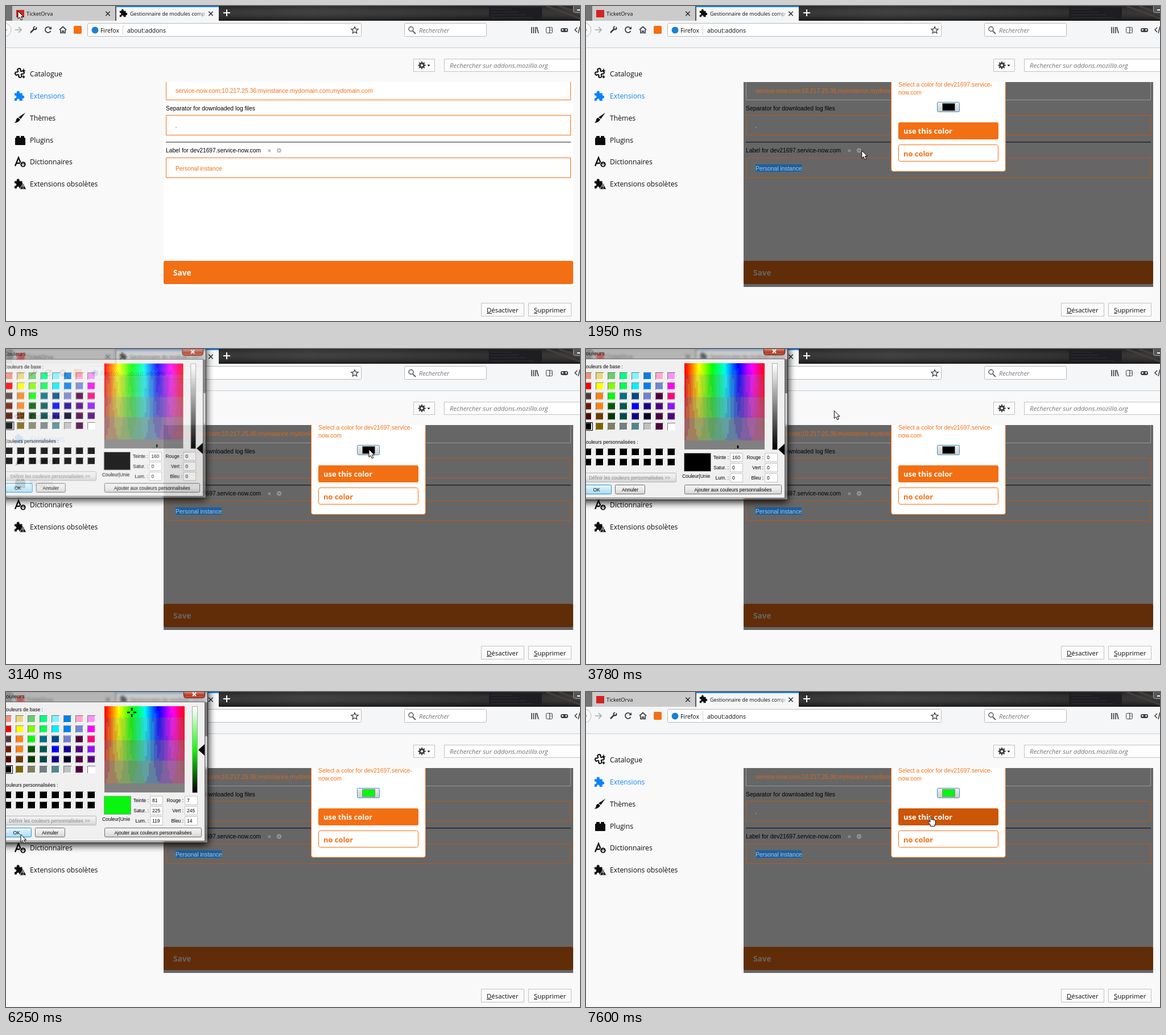
Recreate the animation shown at these times as an HTML page with a canvas. Size 1009 by 555 pixels, loop 8000 ms.

```html
<!DOCTYPE html>
<html lang="fr">
<head>
<meta charset="utf-8">
<title>Modules</title>
<style>
html, body { margin: 0; width: 100%; height: 100%; overflow: hidden; background: #f9f9fa }
canvas { display: block }
</style>
</head>
<body>
<canvas id="stage" width="1009" height="555"></canvas>
<script>
const stage = document.getElementById('stage'), page = stage.getContext('2d');
const PAD = 40, layer = document.createElement('canvas');
layer.width = 440; layer.height = 340;
const dialogCtx = layer.getContext('2d');
dialogCtx.translate(PAD, PAD);
let g = page;

const UI = '"Open Sans", "Noto Sans", sans-serif', ARIAL = '"Liberation Sans", Arial, sans-serif';
const ORANGE = '#f36f14', INK = '#0c0c0d', ICON = '#3d3d40';
const clamp = v => Math.max(0, Math.min(1, v));

function rect(x, y, w, h, color) { g.fillStyle = color; g.fillRect(x, y, w, h); }
function box(x, y, w, h, fill, stroke, r = 0) {
  const inset = stroke ? .5 : 0;
  g.beginPath();
  g.roundRect(x + inset, y + inset, w - 2 * inset, h - 2 * inset, r);
  if (fill) { g.fillStyle = fill; g.fill(); }
  if (stroke) { g.lineWidth = 1; g.strokeStyle = stroke; g.stroke(); }
}
function text(s, x, y, size, color = INK, font = UI, style = '', align = 'left') {
  g.font = `${style} ${size}px ${font}`;
  g.textAlign = align;
  g.fillStyle = color;
  g.fillText(s, x, y);
}
function shape(d, x, y, fill, stroke, width = 1.5) {
  const p = new Path2D(d);
  g.save();
  g.translate(x, y);
  if (fill) { g.fillStyle = fill; g.fill(p); }
  if (stroke) { g.strokeStyle = stroke; g.lineWidth = width; g.stroke(p); }
  g.restore();
}
function disc(x, y, r, fill, stroke, width = 1.5) {
  g.beginPath();
  g.arc(x, y, r, 0, 7);
  if (fill) { g.fillStyle = fill; g.fill(); }
  if (stroke) { g.strokeStyle = stroke; g.lineWidth = width; g.stroke(); }
}
function ramp(x0, y0, x1, y1, ...colors) {
  const grad = g.createLinearGradient(x0, y0, x1, y1);
  colors.forEach((c, i) => grad.addColorStop(i / (colors.length - 1), c));
  return grad;
}
function clipped(x, y, w, h, paint) {
  g.save();
  g.beginPath(); g.rect(x, y, w, h); g.clip();
  paint();
  g.restore();
}
function gear(x, y, r, color, hole) {
  for (let i = 0; i < 8; i++) {
    g.save(); g.translate(x, y); g.rotate(i * Math.PI / 4);
    rect(-r * .2, -r * 1.35, r * .4, r, color);
    g.restore();
  }
  disc(x, y, r * .72, null, color, r * .55);
  disc(x, y, r * .4, hole);
}
const PUZZLE = 'M1 6h4a2.6 2.6 0 1 1 4.5 0h5v4a2.6 2.6 0 1 1 0 5v4h-5a2.4 2.4 0 1 0-4.5 0h-4v-4.5a2.4 2.4 0 1 0 0-4.5z';
function puzzle(x, y, scale, color) {
  g.save(); g.translate(x, y); g.scale(scale, scale);
  shape(PUZZLE, 0, 0, color);
  g.restore();
}
const cross = (x, y, r, color, w) => shape(`M${-r} ${-r}L${r} ${r}M${r} ${-r}L${-r} ${r}`, x, y, null, color, w);

function drawBrowser() {
  // Title bar and tabs
  rect(0, 0, 1009, 26, ramp(374, 0, 1009, 0, '#242424', '#303030', '#282828', '#1c1c1c', '#292726'));
  rect(374, 0, 635, 26, ramp(0, 0, 0, 26, '#fff0', '#0006'));
  rect(849, 2, 93, 22, '#1e1e22');
  for (let i = 0; i < 4; i++) rect(853, 5 + i * 5, 35 + i * 13 % 40, 1, '#2e2e33');
  shape('M950 0L1009 22M972 0L1009 13', 0, 0, null, '#453f3c', 3);
  box(997, -5, 20, 17, '#555', '#aaa', 3);
  rect(1004, 6, 5, 2, '#fff');
  rect(0, 0, 11, 26, '#737373');
  rect(11, 0, 181, 26, '#cbcbcb');
  rect(192, 0, 2, 26, '#555');
  rect(194, 0, 180, 26, '#f5f6f7');
  rect(194, 0, 180, 2, '#0a84ff');
  rect(18, 7, 14, 13, '#d3221f');
  text('TicketOrva', 36, 17, 9.4);
  puzzle(199, 4, .8, INK);
  clipped(210, 0, 141, 26, () => {
    text('Gestionnaire de modules comp', 218, 17, 9.05);
    rect(335, 3, 16, 22, ramp(335, 0, 351, 0, '#f5f6f700', '#f5f6f7b0'));
  });
  cross(179, 13.5, 3.7, '#222', 1.4);
  cross(360, 13.5, 3.7, '#222', 1.4);
  shape('M-6 0H6M0-6V6', 388, 12, null, '#fff', 2);

  // Toolbar
  rect(0, 26, 1009, 47, '#f5f6f7');
  rect(0, 73, 1009, 1, '#cbcbcd');
  disc(-3, 42, 12, '#fbfbfb', '#bbb', 1);
  rect(0, 41, 2, 2, '#aaa');
  shape('M-6 0H5M0-5L5 0L0 5', 22, 42, null, '#a9a9ab', 1.7);
  shape('M-5 5L1-1', 48, 42, null, ICON, 2.6);
  disc(51, 39, 2.4, null, ICON, 2.2);
  shape('M50 39L56 33', 0, 0, null, '#f5f6f7', 2);
  shape('M4.5 2A5 5 0 1 1 3.6-3.6', 74, 42, null, ICON, 1.8);
  shape('M6-6V-1H1z', 74, 42, ICON);
  shape('M-6 0L0-5.5L6 0M-4 0V5.5H-1.2V2H1.2V5.5H4V0', 100, 42, null, ICON, 1.7);
  box(119, 35, 14, 14, ORANGE, null, 2);
  box(143, 30, 482, 24, '#fff', '#b9b9bb', 2);
  disc(156.5, 42.5, 6, '#1c80cf');
  text('Firefox', 166, 47, 10.4);
  rect(205, 33, 1, 18, '#d2d2d4');
  text('about:addons', 213, 47, 10.5);
  shape('M0-6L1.8-2L6-1.7L2.8 1.2L3.8 5.5L0 3.2L-3.8 5.5L-2.8 1.2L-6-1.7L-1.8-2z', 613, 42.5, null, ICON, 1.3);
  box(700, 30, 145, 24, '#fff', '#b9b9bb', 2);
  disc(712, 40.5, 4, null, '#55555a');
  shape('M715 44L720 49', 0, 0, null, '#55555a', 1.8);
  text('Rechercher', 726, 47, 10.9, '#737378', UI, 'italic');
  shape('M924 37V48M927.5 37V48M931 37V48M933 37L936 48', 0, 0, null, ICON, 1.6);
  box(949, 37, 12, 11, null, ICON, 2);
  rect(955, 37, 1, 11, ICON);
  rect(957, 40, 2, 1, ICON); rect(957, 43, 2, 1, ICON);
  box(975, 39, 13, 7, ICON, null, 3);
  disc(978.3, 42, 1.5, '#f5f6f7'); disc(984.7, 42, 1.5, '#f5f6f7');
  shape('M1004 38L1000 42L1004 46M1009 36L1006 48', 0, 0, null, ICON);

  // Add-on manager frame
  rect(0, 74, 1009, 481, '#f9f9fa');
  box(716, 93, 38, 23, '#fbfbfb', '#c1c1c3');
  gear(731, 104.5, 5, ICON, '#fbfbfb');
  shape('M740.5 103.5h5l-2.5 3z', 0, 0, INK);
  box(770, 93, 250, 23, '#fff', '#c1c1c3');
  text('Rechercher sur addons.mozilla.org', 780, 109, 11.35, '#737378', UI, 'italic');
  ['Catalogue', 'Extensions', 'Thèmes', 'Plugins', 'Dictionnaires', 'Extensions obsolètes'].forEach((s, i) =>
    text(s, 42, 124 + i * 38.85, 12.2, i == 1 ? '#0a84ff' : INK));
  for (let i = 0; i < 4; i++) {
    g.save(); g.translate(24, 118); g.rotate(i * Math.PI / 2);
    shape('M-2.5-3L-4-5.5Q-3-8 0-8Q2.5-7 1.5-4L3-2', 0, 0, null, INK, 2);
    g.restore();
  }
  shape('M0-4L1 0L4 1L1 2L0 5L-1 2L-4 1L-1 0z', 31, 113, INK);
  shape('M0-3L1 0L3 1L1 2L0 4L-1 2L-3 1L-1 0z', 31, 124, INK);
  puzzle(14, 147.5, 1.02, '#0a84ff');
  shape('M34 188L26 199L22 196zM21.5 197L25 200Q23 205 15 206Q18 203 18 200Q19 197 21.5 197z', 0, 0, INK);
  box(16, 232, 18, 13, INK, null, 1);
  rect(18, 229, 6, 3, INK); rect(26, 229, 6, 3, INK);
  shape('M16 282L22 267L28 282M18 277H26', 0, 0, null, INK, 2.3);
  disc(30, 279, 5.2, INK, '#f9f9fa', 1);
  shape('M30 276V281M27.5 279L30 281.5L32.5 279', 0, 0, null, '#fff', 1.3);
  puzzle(14, 302.5, 1, INK);
  shape('M30 313L36 323H24z', 0, 0, INK, '#f9f9fa', 1);
  rect(29.4, 316, 1.3, 3.5, '#fff'); rect(29.4, 320.5, 1.3, 1.3, '#fff');
  [['Désactiver', 835, 9], ['Supprimer', 918, 6]].forEach(([s, x, w]) => {
    box(x, 523, 76, 24, '#fbfbfb', '#c1c1c3');
    text(s, x + 10, 539.5, 11.4);
    rect(x + 10, 541, w, 1, INK);
  });
}

function drawOptions(modal, gearHot) {
  rect(277, 134, 720, 361, '#fff');
  clipped(277, 134, 720, 361, () => {
    box(277, 449, 720, 41, ORANGE, null, 3);
    text('Save', 294, 475, 13.7, '#fff', UI, 'bold');
    if (modal) rect(277, 134, 720, 361, 'rgba(0,0,0,.6)');
    const tint = modal ? '#d9681c' : ORANGE, edge = modal ? '#b85a1c' : ORANGE;
    box(281, 120, 712, 46, null, modal ? '#999' : ORANGE);
    box(281, 192, 712, 36, null, edge);
    box(281, 267, 712, 36, null, edge);
    text('service-now.com;10.217.25.36;myinstance.mydomain.com;mydomain.com', 298, 153, 10.5, tint, ARIAL);
    text('Separator for downloaded log files', 281, 184, 10.35, '#000', ARIAL);
    text(',', 298, 214, 11, modal ? '#bbb' : '#777', ARIAL, 'italic');
    rect(281, 239, 712, 1.5, modal ? '#222' : '#666');
    text('Label for dev21697.service-now.com', 281, 258, 10.25, '#000', ARIAL);
    cross(463, 255, 2.2, modal ? '#999' : '#aaa', 1.3);
    gear(480, 254.5, 3.4, gearHot ? ORANGE : modal ? '#999' : '#bbb', modal ? '#666' : '#fff');
    if (modal) rect(298, 279, 81, 13, '#1f5f9c');
    text('Personal instance', 298, 290, 10.25, modal ? '#a3c8ea' : ORANGE, ARIAL);
  });
}

function drawModal(pressed, color, hot) {
  clipped(530, 134, 220, 170, () => {
    box(536, 120, 202, 172, '#fff', ORANGE, 4);
    text('Select a color for dev21697.service-', 549, 142, 10.35, ORANGE, ARIAL);
    text('now.com', 549, 156, 10.35, ORANGE, ARIAL);
    box(617, 169, 40, 18, pressed ? ramp(0, 169, 0, 187, '#e5f4fc', '#98d1ef', '#68b3db') :
      ramp(0, 169, 0, 187, '#f2f2f2', '#dcdcdc', '#cfcfcf'), pressed ? '#2c628b' : '#3c8fc1', 2);
    box(626, 171, 23, 14, color, '#888');
    box(549, 205, 176, 30, hot ? '#cc5506' : ORANGE, null, 3);
    text('use this color', 558, 224.5, 12.9, '#fff', UI, 'bold');
    box(549, 244, 176, 30, '#fff', ORANGE, 3);
    text('no color', 558, 264.5, 12.9, ORANGE, UI, 'bold');
  });
}

const BASIC = `f0907a e8d878 68cf68 00ff80 80f4ff 0080e8 ffa8cc ff90ff
  ff0000 ffff00 80ff00 00ff50 00f0ff 0080f0 7088d0 ff00ff
  503838 ff8010 00ff00 006c84 004888 7080d0 500040 ff0080
  701800 ff8010 005800 005850 0000ff 180090 500080 9010ff
  480c00 703800 003800 004848 100088 000028 500040 500080
  000000 7c6400 808060 748080 508890 c0c0c0 500040 ffffff`.split(/\s+/);

function swatch(col, y, color) {
  const x = -4 + col * 21;
  rect(x, y - 6, 14, 13, '#777');
  rect(x + 1, y - 5, 13, 12, '#fff');
  rect(x + 1, y - 5, 12, 11, color);
}
const label = (s, x, y, align, color = '#000') => text(s, x, y, 8.45, color, ARIAL, '', align);
const PLAIN = ['#f4f4f4', '#e9e9e9', '#d2d2d2'], FOCUSED = ['#eef8fe', '#c8e9fc', '#a9daf5'];
function button(x, w, y, s, shades = PLAIN, border = '#707070') {
  box(x, y, w, 17, ramp(0, y, 0, y + 17, ...shades), border, 2);
  label(s, x + w / 2, y + 11.5, 'center');
}

// Hue across, saturation down, in coarse colour steps
function drawSpectrum() {
  const coarse = v => Math.round(v / 32) * 32;
  for (let x = 0; x < 141; x += 3)
    for (let y = 0; y < 152; y += 4) {
      const rgb = [0, 4, 2].map(k => {
        const hue = clamp(Math.abs((x / 23.5 + k) % 6 - 3) - 1);
        return coarse(128 + (hue * 255 - 128) * (1 - y / 152));
      });
      rect(173 + x, 25 + y, 3, 4, `rgb(${rgb})`);
    }
}

function drawDialog(picked, lit) {
  g.clearRect(-PAD, -PAD, 440, 340);
  // Glass frame over the blurred page
  g.shadowColor = '#000'; g.shadowBlur = 14; g.shadowOffsetY = 3;
  box(-PAD, -10, 355 + PAD, 276, '#aaa', '#222', 5);
  g.shadowColor = 'transparent';
  clipped(-PAD, 0, 354 + PAD, 265, () => {
    g.filter = 'blur(2px)';
    g.drawImage(stage, 0, 0);
    g.filter = 'none';
    rect(-PAD, 0, 400, 266, 'rgba(160,160,160,.5)');
  });
  rect(349, 18, 5, 60, '#777');
  box(-PAD, 17, 350 + PAD, 246, '#f0f0f0', '#666');
  box(312, -5, 38, 16, ramp(0, 0, 0, 11, '#d9897b', '#b93a22', '#c8604a'), '#5a1a12', 4);
  cross(331, 4, 3, '#fff', 2);
  text('Couleurs', -6, 11, 9.3, '#000');

  label('Couleurs de base :', -6, 34);
  BASIC.forEach((c, i) => swatch(i % 8, 47 + (i >> 3) * 17.8, '#' + c));
  box(-5, 129, 17, 15, null, '#000');
  label('Couleurs personnalisées :', -6, 167);
  for (let i = 0; i < 16; i++) swatch(i % 8, 181 + (i >> 3) * 18, '#000');
  button(-10, 169, 218, '', PLAIN, '#b5b5b5');
  label('Définir les couleurs personnalisées >>', 5, 229.5, 'left', '#838383');
  button(-8, 53, 239, 'OK', FOCUSED, '#2a94cc');
  button(51, 53, 239, 'Annuler');
  button(173, 171, 239, 'Ajouter aux couleurs personnalisées');

  drawSpectrum();
  clipped(173, 25, 141, 152, () =>
    shape('M-8 0H-3M3 0H8M0-8V-3M0 3V8', picked ? 221 : 267, picked ? 36 : 178, null, '#000', 2.6));
  box(327, 25, 10, 153, null, '#aaa');
  for (let i = 0; i < 38; i++)
    rect(328, 26 + i * 4, 8, i < 37 ? 4 : 3, `hsl(116 ${picked ? 94 : 0}% ${100 - i / 37 * 100}%)`);
  shape('M0 0L11-10V10z', 338, lit ? 102 : 177, '#000');

  box(172, 183, 48, 33, lit ? '#07f50e' : '#000', '#999');
  label('Couleur|Unie', 169, 227);
  const values = [picked ? 81 : 160, picked ? 225 : 0, lit ? 119 : 0, lit ? 7 : 0, lit ? 245 : 0, lit ? 14 : 0];
  ['Teinte :', 'Satur. :', 'Lum. :', 'Rouge :', 'Vert :', 'Bleu :'].forEach((s, i) => {
    const x = i < 3 ? 253 : 314, y = 183 + i % 3 * 18;
    label(s, x - 2, y + 11, 'right');
    box(x, y, 23, 16, '#fff', '#c4c4c8');
    label(values[i], x + 4, y + 11);
  });
}

const ARROW = 'M0 0V13.5L3.1 10.7L5.3 15.8L7.8 14.7L5.6 9.8H9.8z';
const HAND = 'M-1.2.8Q0-.8 1.2.8V6Q2.5 4.8 3.6 6.2Q5 5.2 6 6.8Q7.4 6 8.4 7.8V12Q8 14 7 15V17.5H-.5V15.5L-4.3 10.5Q-4.8 8.3-3 8.6L-1.2 10.5z';

// Pointer stops: time, x, y
const STOPS = [[0, 21, 9], [640, 766, 160], [1160, 500, 249], [1310, 484, 254], [2200, 485, 255],
  [2700, 638, 177], [3260, 638, 177], [4300, 221, 36], [4420, 221, 36], [4800, 330, 88], [5340, 331, 102],
  [5500, 331, 102], [6240, 26, 251], [6500, 26, 251], [7440, 601, 223], [7600, 606, 219], [8000, 606, 219]];
function pointer(t) {
  const i = STOPS.findIndex(s => s[0] > t), [a, x0, y0] = STOPS[i - 1], [b, x1, y1] = STOPS[i];
  const u = (t - a) / (b - a), e = u * u * (3 - 2 * u);
  return [x0 + (x1 - x0) * e, y0 + (y1 - y0) * e];
}

// Bursts of evenly spaced screen updates: first, last, count
const BURSTS = [[120, 1160, 8], [1310, 1950, 5], [2320, 3260, 8], [3370, 4300, 8],
  [4420, 5340, 8], [5470, 6400, 7], [6520, 7440, 8], [7600, 7600, 1]];
function snap(t) {
  let last = 0;
  for (const [a, b, n] of BURSTS)
    for (let i = 0; i < n; i++) {
      const s = a + (b - a) * i / (n - 1 || 1);
      if (s <= t + .5) last = s;
    }
  return last;
}

function draw(now) {
  const t = snap(now % 8000), [x, y] = pointer(t);
  const modal = t > 1940, picked = t >= 4419, lit = t >= 5469;
  const alpha = Math.min(clamp((t - 2900) / 260), clamp((6680 - t) / 260));
  const gearHot = !modal && Math.hypot(x - 482, y - 254) < 7;
  const saveHot = modal && alpha < .1 && x > 549 && x < 725 && y > 205 && y < 235;
  drawBrowser();
  drawOptions(modal, gearHot);
  if (modal) drawModal(t > 2700 && t < 2990, lit ? '#07f50e' : '#000', saveHot);
  if (alpha) {
    g = dialogCtx;
    drawDialog(picked, lit);
    g = page;
    g.save();
    g.globalAlpha = alpha;
    const k = .88 + .12 * alpha;
    g.translate(155, 60); g.scale(k, k); g.translate(-155, -60);
    g.drawImage(layer, -PAD, -PAD);
    g.restore();
  }
  const onSpectrum = picked && t < 4500;
  if (!onSpectrum) shape(gearHot || saveHot ? HAND : ARROW, x, y, '#fff', '#000', 1);
}

function loop() {
  draw(performance.now());
  requestAnimationFrame(loop);
}
loop();
</script>
</body>
</html>
```
